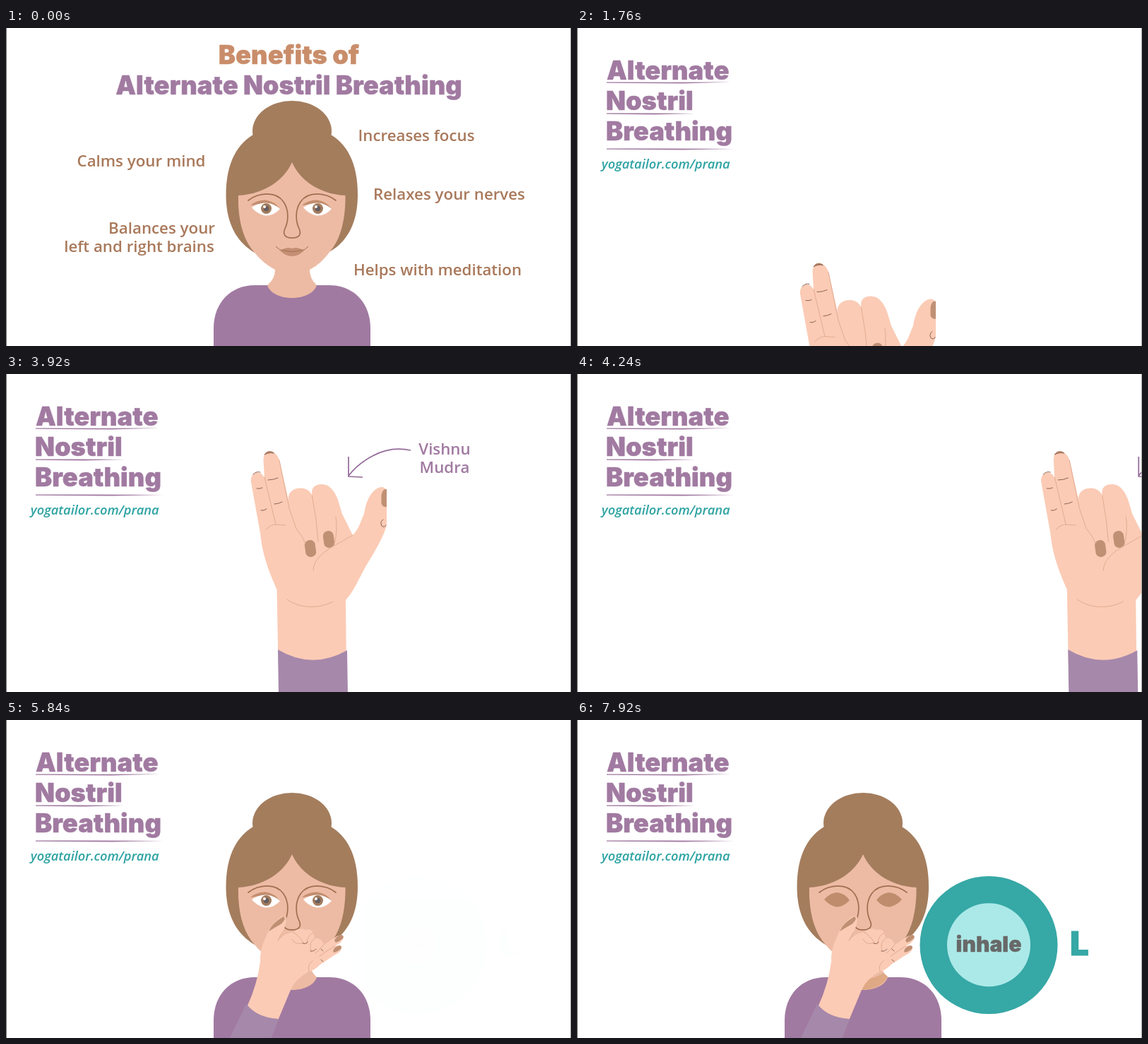
An HTML page that plays this animation: 800 by 450 pixels, repeating every 8 s.

```html
<!DOCTYPE html>
<html lang="en">
<head>
<meta charset="utf-8">
<title>Alternate Nostril Breathing</title>
<style>
  html, body { margin: 0; width: 100%; height: 100%; overflow: hidden; background: #fff; }
  svg { display: block; width: 100vw; height: 100vh; }
  .heavy { font-family: Inter, sans-serif; font-weight: 900; font-size: 36.3px; stroke-width: .4; stroke-linejoin: round; }
  .note { font-family: "Open Sans", sans-serif; font-weight: 600; font-size: 22.3px; text-anchor: middle; fill: #a9795b; }
  .link { font-family: "Open Sans", sans-serif; font-weight: 600; font-size: 18.3px; font-style: italic; text-anchor: middle; fill: #2fa3a3; }
  .purple { fill: #a17aa1; stroke: #a17aa1; }
  .tan { fill: #c98d6a; stroke: #c98d6a; }
  .teal { fill: #36a8a6; stroke: #36a8a6; }
  .mid { text-anchor: middle; }
  .skin { fill: #fbcbb5; }
  .nail { fill: #c09074; }
  .crease { fill: none; stroke: #e3ab91; stroke-width: 1; stroke-linecap: round; }
  .joint { fill: none; stroke: #8c6455; stroke-width: 1; stroke-linecap: round; }
  .contour { fill: none; stroke: #a06f50; stroke-width: 1.7; stroke-linecap: round; }
  .ink { fill: none; stroke: #94699a; stroke-width: 1.7; }
</style>
</head>
<body>
<svg viewBox="0 0 800 450" preserveAspectRatio="none">
  <defs>
    <g id="openEye">
      <path d="M346 251Q355 243 368 243.500Q382 246 388 256Q370 247 346 251Z" fill="#c38d6e"/>
      <path d="M348 254Q357 247 369 247.500Q381 249 388 256Q379 266 367 265.500Q355 263 348 254Z" fill="#fff"/>
      <circle cx="368.500" cy="255.500" r="7.500" fill="#a17a5d"/>
      <circle cx="368.500" cy="255.500" r="3.800" fill="#665d60"/>
      <circle cx="366" cy="253" r="2" fill="#fff"/>
    </g>
    <path id="closedEye" d="M350 254Q359 244 369 244Q380 246 386 255Q377 265 367 264.500Q357 262 350 254Z" fill="#bf8d6d"/>
    <path id="browLine" class="contour" d="M343 244C357 233 382 230 393 246C401 258 400 273 395 284C391 293 396 297 405 297"/>
  </defs>

  <rect width="800" height="450" fill="#fff"/>

  <g id="intro">
    <text class="heavy tan mid" x="400.500" y="51">Benefits of</text>
    <text class="heavy purple mid" x="400.500" y="94">Alternate Nostril Breathing</text>
    <text class="note" x="191.500" y="196">Calms your mind</text>
    <text class="note" x="220.500" y="291">Balances your</text>
    <text class="note" x="188.500" y="317">left and right brains</text>
    <text class="note" x="581" y="160">Increases focus</text>
    <text class="note" x="627.500" y="243">Relaxes your nerves</text>
    <text class="note" x="611" y="350">Helps with meditation</text>
  </g>

  <g id="heading">
    <text class="heavy purple" x="42" y="73">Alternate</text>
    <text class="heavy purple" x="41" y="116">Nostril</text>
    <text class="heavy purple" x="41" y="159">Breathing</text>
    <g fill="#a17aa1">
      <path d="M42 76.500L130 76.800L218 76.500L150 78.500L42 77.700Z"/>
      <path d="M42 120.500L105 120.600L168 121L110 122.500L42 121.700Z"/>
      <path d="M42 170.500L130 170.400L223 171L150 172.400L42 171.700Z"/>
    </g>
    <text class="link" x="125.700" y="198.600">yogatailor.com/prana</text>
  </g>

  <g id="mudra">
    <path class="skin" d="M352.500 305C343 283 332 258 329 225L316 153C314 139 329 134 335 147L333.500 122C333 106 352 106 356 122L369 179C367 166 378 161 387 161.500C395 162 400 166 402.500 172C400 160 408 156 416 156C427 156 434 165 439 178L445 198L460 228C469 219 470 211 476 198C479 178 488 161 501 160Q507 160 508 167V214C503 232 490 253 479 271C467 293 461 308 450 320L451 410H354.500Z"/>
    <path d="M354 390Q403 419 452 391L453 452H355Z" fill="#a688ab"/>
    <path class="nail" d="M508 163Q502 162 500.500 172V183Q502 189 508 188Z"/>
    <rect class="nail" x="392.500" y="235" width="15" height="24" rx="7" transform="rotate(-8 400 247)"/>
    <rect class="nail" x="418.500" y="222" width="15" height="24" rx="7" transform="rotate(-8 426 234)"/>
    <path class="nail" d="M334.500 115Q337 109 342 109Q347 109 349 113Q341 111 334.500 115Z"/>
    <path class="joint" d="M335 114Q341 109 348 111.500M319 142Q324 137 329 139M340 150Q348 150 354 147M349 184Q354 184 360 181M324 162Q328 163 332 161M330 193Q334 194 338 191M503 206Q498 209 501 215Q505 218 507 214"/>
    <path class="crease" d="M335 146L351 213M337 220Q345 212 352 213L365 214M356 122L370 190L380 219Q389 229 393 240M402.500 172L408 206L411 237M436 202Q439 222 434 240M404 278C405 254 434 244 460 228M367 319C386 333 414 332 432 322"/>
    <path id="arrow" class="ink" pathLength="100" d="M542 108Q514 102 488 116Q467 127 454 144"/>
    <path id="arrowHead" class="ink" d="M454 117V145L474 146"/>
    <g id="mudraName">
      <text class="note" x="590" y="114" style="fill:#a17aa1">Vishnu</text>
      <text class="note" x="590" y="140" style="fill:#a17aa1">Mudra</text>
    </g>
  </g>

  <g id="woman">
    <path d="M352 318C322 300 311.500 270 311.500 236C311.500 190 328 163 352 150H458C482 163 498 190 498 236C498 270 487 300 459 316Z" fill="#a47d5d"/>
    <ellipse cx="405" cy="146" rx="56" ry="43" fill="#a47d5d"/>
    <path d="M294 452V425C294 389 318 364 352 364H458C492 364 516 389 516 425V452Z" fill="#a17aa1"/>
    <path d="M405 190C415 213 441 235 480.500 237C481 270 474 299 459 316Q446 334 430 342Q430 355 440 364C432 388 378 388 370 364Q381 355 381 342Q364 333 352 318C335 299 328 270 329 237C368 235 395 213 405 190Z" fill="#edbba4"/>
    <use href="#browLine"/>
    <use href="#browLine" transform="matrix(-1 0 0 1 810 0)"/>
    <g id="eyesOpen">
      <use href="#openEye"/>
      <use href="#openEye" transform="translate(73)"/>
    </g>
    <g id="eyesClosed">
      <use href="#closedEye"/>
      <use href="#closedEye" transform="matrix(-1 0 0 1 810 0)"/>
      <path d="M402 382Q431 381 440 363L434 358Q421 366 408 367Z" fill="#e0a985"/>
    </g>
    <path d="M388 315Q398 309 405 312Q412 309 422 315Q414 323 405 323Q396 323 388 315Z" fill="#c48f74"/>
    <path d="M382 309Q387 315 393 315Q405 318 417 315Q423 315 428 309" fill="none" stroke="#a06f50" stroke-width="1"/>
  </g>

  <g id="closingHand">
    <path class="skin" d="M342 404Q356 373 360 342Q359 325 368 307Q373 292 386 281Q394 275 397 279Q397 291 391 301L385 312Q396 301 406 300Q416 293 424 297Q433 295 435 301L437 309Q446 307 450 318L468 306Q478 302 478 308Q476 315 465 320Q475 317 475 323Q474 329 463 334L445 346Q436 355 429 356Q410 366 403 382L385 425Q357 422 342 404Z"/>
    <path d="M340 402Q355 421 386 423L375 452H316Z" fill="#a688ab"/>
    <path class="nail" d="M372 299Q377 287 393 278L395 281Q393 288 382 293Z"/>
    <path class="nail" d="M465 312Q468 305 475 304Q479 305 477 309Q473 313 467 315Z"/>
    <path class="nail" d="M463 327Q465 320 473 319Q477 321 473 325Q469 328 464 329Z"/>
    <path class="crease" d="M391 301L385 312M406 300Q414 304 421 315M435 301Q426 306 426 316M437 309Q428 315 432 327M450 318Q443 326 438 330M465 320L444 334M421 315Q410 320 405 310M429 356Q426 346 434 341"/>
    <path class="joint" d="M420 316Q425 318 427 314M431 327Q436 328 439 324M446 324L449 327M446 339L449 342"/>
  </g>

  <g id="breath">
    <circle cx="583" cy="318.500" r="97.500" fill="#36a8a6"/>
    <g id="pulse">
      <circle r="59" fill="#abe9e8"/>
      <text class="heavy mid" y="10" fill="#686868" stroke="#686868" style="font-size:30px">inhale</text>
    </g>
    <text class="heavy teal mid" x="711.500" y="332.500" style="font-size:46.500px;stroke-width:1.200;stroke-linejoin:miter">L</text>
  </g>

  <rect width="1" height="450" fill="#777"/>
  <rect x="799" width="1" height="450" fill="#aaa"/>
</svg>
<script>
  const LOOP = 8000, CUT = 1360;
  const $ = id => document.getElementById(id);
  const ramp = (t, start, end) => Math.min(1, Math.max(0, (t - start) / (end - start)));
  const remaining = (t, start, end) => (1 - ramp(t, start, end)) ** 2;
  const show = (id, on) => $(id).setAttribute("display", on ? "inline" : "none");
  const fade = (id, value) => $(id).setAttribute("opacity", value);
  const move = (id, x, y) => $(id).setAttribute("transform", `translate(${x} ${y})`);

  function render(t) {
    show("intro", t < CUT);
    show("heading", t >= CUT);

    // The hand rises, gets its label, then leaves to the right.
    show("mudra", t >= CUT && t < 4400);
    const exit = 340 * (Math.max(0, t - 3840) / 400) ** 1.5;
    move("mudra", exit, 362 * remaining(t, 1600, 2352));
    const drawn = 100 * ramp(t, 2400, 2550);
    show("arrow", drawn > 0);
    $("arrow").setAttribute("stroke-dasharray", `${drawn} 200`);
    show("arrowHead", drawn === 100);
    fade("mudraName", ramp(t, 2560, 2840));

    // The woman enters from the left while her hand comes up.
    show("woman", t < CUT || t >= 4900);
    move("woman", t < CUT ? 0 : -560 * remaining(t, 4900, 5611), 0);
    show("closingHand", t >= 5040);
    const lift = remaining(t, 5040, 5760);
    move("closingHand", -52 * lift, 326 * lift);
    const closed = t >= 6000;
    show("eyesOpen", !closed);
    show("eyesClosed", closed);

    fade("breath", ramp(t, 5840, 6160));
    const scale = 0.653 + 0.347 * (t - 6560) / 1360;
    $("pulse").setAttribute("transform", `translate(583 318.3) scale(${Math.max(0, scale)})`);
  }

  function tick() {
    render(performance.now() % LOOP);
    requestAnimationFrame(tick);
  }
  tick();
</script>
</body>
</html>
```
